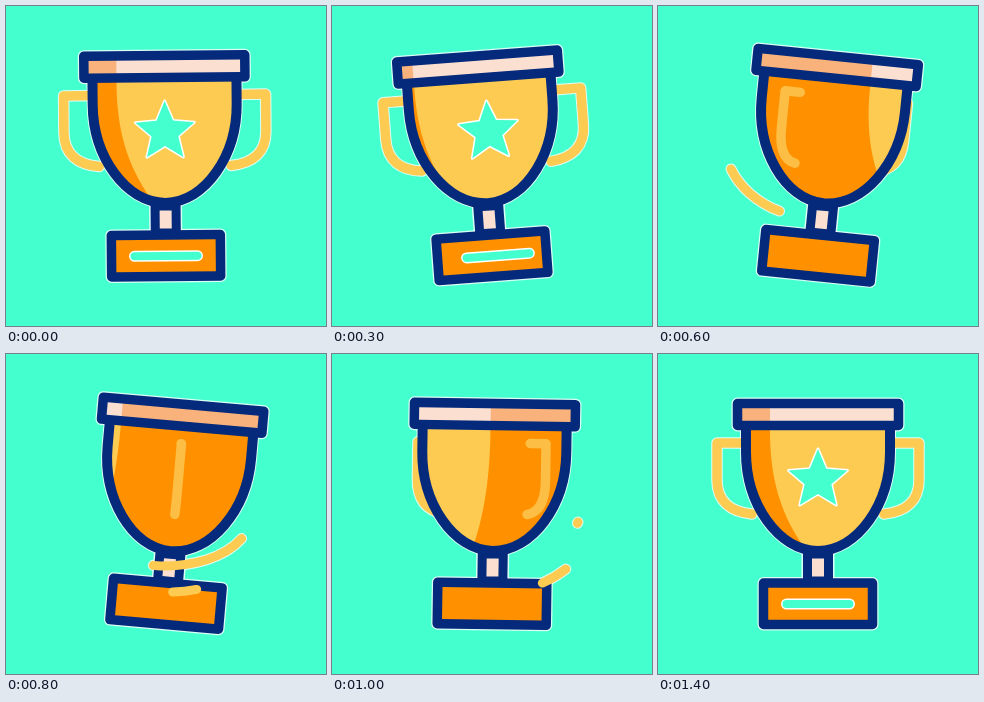
Recreate the animation shown at these times as an HTML page with a canvas. Size 320 by 320 pixels, loop 1500 ms.

```html
<!DOCTYPE html>
<html lang="en">
<head>
<meta charset="utf-8">
<title>Spinning trophy</title>
<style>
html, body { margin: 0; width: 100%; height: 100%; overflow: hidden; background: #44ffce; }
canvas { display: block; width: 100vw; height: 100vh; }
</style>
</head>
<body>
<canvas id="stage" width="320" height="320"></canvas>
<script>
const ctx = document.getElementById('stage').getContext('2d');
const STEP = 100, LOOP = 1500, TURN = 700, CX = 160;
const BG = '#44ffce', NAVY = '#052a7c', ORANGE = '#ff9100', YELLOW = '#fdcb52',
      GOLD = '#fdbe45', PEACH = '#f9b27c', PINK = '#fbe0d2', HALO = 'rgba(255,255,255,.8)';

const cup = new Path2D('M88 68V98C88 150 120 196 160 197C200 196 232 150 232 98V68Z');
const rim = new Path2D('M79.5 49.5H240.5V71.5H79.5Z');
const base = new Path2D('M105.5 229H214.5V270.5H105.5Z');
const stem = new Path2D('M149.5 200V227H170.5V200Z');
const slot = new Path2D('M128.5 250H191.5');
const star = new Path2D();
for (let i = 0; i < 10; i++) {
  const r = i % 2 ? 14 : 31, a = i * Math.PI / 5;
  star.lineTo(CX + r * Math.sin(a), 126 - r * Math.cos(a));
}
star.closePath();

const ribbons = [
  { path: new Path2D('M73 163C85 188 115 210 155 212C195 212 233 200 246 168'), length: 210, start: 492, lag: 145 },
  { path: new Path2D('M166 238Q208 238 240 210'), length: 83, start: 697, lag: 100 }
];

const clamp = (v, lo, hi) => Math.min(hi, Math.max(lo, v));
const lerp = (t, t0, v0, t1, v1) => v0 + (v1 - v0) * clamp((t - t0) / (t1 - t0), 0, 1);
const ease = (t, t0, v0, t1, v1) =>
  lerp((1 - Math.cos(Math.PI * clamp((t - t0) / (t1 - t0), 0, 1))) / 2, 0, v0, 1, v1);

// Lean back, swing forward, settle.
function tilt(t) {
  if (t < 300) return ease(t, 0, -.5, 300, -4.3);
  if (t < 650) return ease(t, 300, -4.3, 620, 5.9);
  return ease(t, 700, 5.9, 1100, 0);
}

// Half a turn at constant speed; everything on the surface follows the angle.
function poseAt(t) {
  const angle = lerp(t, 195, -Math.PI / 2, 1395, Math.PI / 2);
  const firstHalf = t < TURN;
  return {
    tilt: tilt(t) * Math.PI / 180,
    front: Math.sin(angle),
    back: -Math.sin(clamp(angle * 1.6, -Math.PI / 2, Math.PI / 2)),
    slide: (firstHalf ? 300 : -300) * Math.cos(angle) ** 3,
    left: t < 300 ? lerp(t, 0, 112, 300, 95)
      : firstHalf ? lerp(t, 300, 95, TURN, 228) : lerp(t, TURN, 60, 1400, 112),
    right: firstHalf ? 270 : lerp(t, TURN, 71, 1400, 269)
  };
}

function stroke(path, color, width) {
  ctx.strokeStyle = color;
  ctx.lineWidth = width;
  ctx.stroke(path);
}

function fill(path, color) {
  ctx.fillStyle = color;
  ctx.fill(path);
}

function inside(path, paint) {
  ctx.save();
  ctx.clip(path);
  paint();
  ctx.restore();
}

function handle(s) {
  const x = r => CX + s * r;
  return new Path2D(`M${x(70)} 89H${x(101)}V126C${x(101)} 147 ${x(88)} 158 ${x(66)} 160`);
}

// Lit surface between two curved edges.
function lightBand(l, r) {
  const dl = 39, dr = -18;
  return new Path2D(`M${l} 40V75C${l} 110 ${l + dl * .1} 155 ${l + dl} 200` +
    `H${r + dr}C${r + dr * .1} 155 ${r} 110 ${r} 75V40Z`);
}

function drawRibbon({ path, length, start, lag }, t, color, width) {
  const head = clamp((t - start) * .0029, 0, 1);
  const tail = clamp((t - start - lag) * .0027, 0, 1);
  if (head - tail < .01) return;
  ctx.save();
  ctx.setLineDash([(head - tail) * length, 999]);
  ctx.lineDashOffset = -tail * length;
  stroke(path, color, width);
  ctx.restore();
}

function drawTrophy(pose) {
  const frontPath = handle(pose.front), backPath = handle(pose.back);
  const overCup = Math.abs(pose.front) < .93;
  const light = lightBand(pose.left, pose.right);
  const behind = overCup ? [backPath] : [backPath, frontPath];

  for (const p of [backPath, frontPath]) stroke(p, HALO, 11.5);
  for (const p of [cup, rim, base, stem]) stroke(p, HALO, 12);
  for (const p of behind) stroke(p, YELLOW, 9.5);

  fill(stem, PINK);
  stroke(stem, NAVY, 9);

  fill(cup, ORANGE);
  inside(cup, () => {
    fill(light, YELLOW);
    ctx.translate(pose.slide, 0);
    stroke(star, '#fff', 3);
    fill(star, BG);
  });
  stroke(cup, NAVY, 10);

  fill(rim, PEACH);
  inside(rim, () => fill(light, PINK));
  stroke(rim, NAVY, 9.5);

  fill(base, ORANGE);
  inside(base, () => {
    ctx.translate(pose.slide, 0);
    stroke(slot, '#fff', 11);
    stroke(slot, BG, 8);
  });
  stroke(base, NAVY, 9.5);

  if (overCup) stroke(frontPath, Math.abs(pose.front) > .8 ? YELLOW : GOLD, 9.5);
}

function draw(t) {
  const pose = poseAt(t);
  ctx.fillStyle = BG;
  ctx.fillRect(0, 0, 320, 320);
  ctx.lineJoin = ctx.lineCap = 'round';

  for (const r of ribbons) drawRibbon(r, t, HALO, 11);

  ctx.save();
  ctx.translate(CX, 250);
  ctx.rotate(pose.tilt);
  ctx.translate(-CX, -250);
  drawTrophy(pose);
  ctx.restore();

  for (const r of ribbons) drawRibbon(r, t, YELLOW, 9);
}

let start = null, shown = -1;
function tick(now) {
  if (start === null) start = now;
  const t = Math.floor((now - start) % LOOP / STEP) * STEP;
  if (t !== shown) draw(shown = t);
  requestAnimationFrame(tick);
}
draw(0);
requestAnimationFrame(tick);
</script>
</body>
</html>
```
